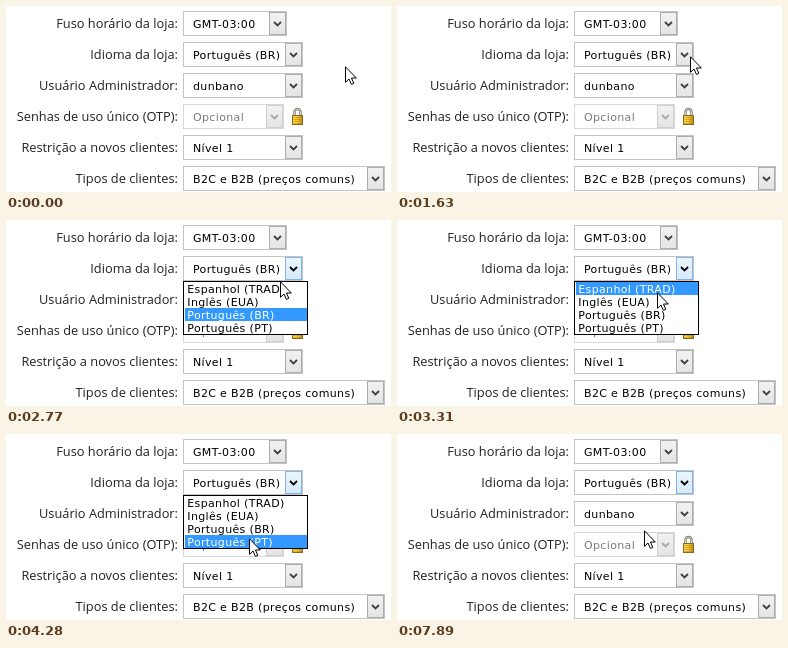
These frames come from a looping animation (385x186 px, 8290 ms). An HTML page:

```html
<!DOCTYPE html>
<html lang="pt-BR">
<head>
<meta charset="utf-8">
<title>Configurações da loja</title>
<style>
html, body { margin: 0; width: 100%; height: 100%; overflow: hidden; background: #fff; }
svg { display: block; width: 385px; height: 186px; }
rect { shape-rendering: crispEdges; }
.label { font: 12.8px "Open Sans", sans-serif; fill: #222; text-anchor: end; }
.value { font: 11px "DejaVu Sans", Verdana, sans-serif; letter-spacing: .35px; }
</style>
</head>
<body>
<svg id="stage" viewBox="0 0 385 186" xmlns="http://www.w3.org/2000/svg">
  <defs>
    <linearGradient id="grey" x2="0" y2="1"><stop stop-color="#f2f2f2"/><stop offset="1" stop-color="#e4e4e4"/></linearGradient>
    <linearGradient id="blue" x2="0" y2="1"><stop stop-color="#ecf5fd"/><stop offset="1" stop-color="#d6e9fb"/></linearGradient>
    <linearGradient id="gold"><stop stop-color="#ffe45c"/><stop offset=".5" stop-color="#f3c52f"/><stop offset="1" stop-color="#b98a1c"/></linearGradient>
  </defs>
</svg>
<script>
const LOOP = 8290;
const OPEN_AT = 2060, CLOSE_AT = 7890;
const LEFT = 177, ROW_H = 31, BOX_H = 25;
const LIST_TOP = 61, ITEM_H = 13;

// label, value, box width
const ROWS = [
  ["Fuso horário da loja:", "GMT-03:00", 104],
  ["Idioma da loja:", "Português (BR)", 120],
  ["Usuário Administrador:", "dunbano", 120],
  ["Senhas de uso único (OTP):", "Opcional", 101],
  ["Restrição a novos clientes:", "Nível 1", 120],
  ["Tipos de clientes:", "B2C e B2B (preços comuns)", 202]
];
const ITEMS = ["Espanhol (TRAD)", "Inglês (EUA)", "Português (BR)", "Português (PT)"];
const CHOSEN = 2;

// The pointer rests, then glides to each goal in evenly timed poses.
const HOME = { x: 339, y: 60 };
const GLIDES = [
  { from: 1120, to: 1630, poses: 5, x: 293, y: 50 },
  { from: 2620, to: 2770, poses: 2, x: 274, y: 61 },
  { from: 2920, to: 3610, poses: 6, x: 252, y: 78 },
  { from: 3890, to: 4280, poses: 4, x: 243, y: 104 },
  { from: 4710, to: 4860, poses: 2, x: 247, y: 96 }
];

const stage = document.getElementById("stage");

function add(parent, tag, attrs, text) {
  const el = document.createElementNS("http://www.w3.org/2000/svg", tag);
  for (const key in attrs) el.setAttribute(key, attrs[key]);
  if (text) el.textContent = text;
  return parent.appendChild(el);
}

function box(parent, x, y, width, height, fill, stroke) {
  return add(parent, "rect", { x: x + 0.5, y: y + 0.5, width: width - 1, height: height - 1, fill, stroke });
}

function value(parent, x, y, text, fill) {
  return add(parent, "text", { class: "value", x, y, fill }, text);
}

function drawRow([label, text, width], i) {
  const top = 5 + ROW_H * i, right = LEFT + width, off = i === 3;
  box(stage, LEFT, top, width, BOX_H, "#fff", off ? "#d8d8d8" : "#c4c4c4");
  const button = box(stage, right - 18, top + 1, 17, BOX_H - 2, "url(#grey)", off ? "#cfcfcf" : "#acacac");
  const arrow = add(stage, "path", {
    d: `M${right - 13} ${top + 11}l3.5 3.5l3.5 -3.5`,
    fill: "none", stroke: off ? "#a8a8a8" : "#404040", "stroke-width": 1.8
  });
  add(stage, "text", { class: "label", x: 172, y: top + 17 }, label);
  value(stage, 187, top + 17, text, off ? "#7a7a7a" : "#000");
  return { button, arrow };
}

function drawLock() {
  const shackle = "M288.5 110V106a3 3 0 0 1 6 0V110";
  add(stage, "path", { d: shackle, fill: "none", stroke: "#77736a", "stroke-width": 2.4 });
  add(stage, "path", { d: shackle, fill: "none", stroke: "#d8d6d0", "stroke-width": 1 });
  box(stage, 286, 109, 11, 10, "url(#gold)", "#8a6a1c");
  for (let y = 111; y < 118; y += 2)
    add(stage, "rect", { x: 287, y, width: 9, height: 1, fill: "#b98414", opacity: 0.5 });
}

function drawList() {
  const g = add(stage, "g", {});
  box(g, LEFT, LIST_TOP, 125, ITEMS.length * ITEM_H + 2, "#fff", "#000");
  const mark = add(g, "rect", { x: LEFT + 2, width: 122, height: ITEM_H, fill: "#3399ff" });
  const items = ITEMS.map((text, i) => value(g, 181.3, LIST_TOP + 12 + ITEM_H * i, text));
  return { g, mark, items };
}

const language = ROWS.map(drawRow)[1];
drawLock();
const list = drawList();
const pointer = add(stage, "path", {
  d: "M.5 .8V16.3L4 13L6.4 18.4L8.8 17.4L6.5 12H11.3Z",
  fill: "#fff", stroke: "#000"
});

function pointerAt(t) {
  let { x, y } = HOME;
  for (const glide of GLIDES) {
    if (t < glide.from) break;
    const gap = (glide.to - glide.from) / (glide.poses - 1);
    const pose = Math.min(glide.poses - 1, Math.floor((t - glide.from) / gap));
    const ease = Math.sin((pose + 0.5) / (glide.poses - 0.5) * Math.PI / 2);
    x += (glide.x - x) * ease;
    y += (glide.y - y) * ease;
  }
  return { x: Math.round(x), y: Math.round(y) };
}

function render(t) {
  const { x, y } = pointerAt(t);
  const hover = Math.floor((y - LIST_TOP - 2) / ITEM_H);
  const picked = hover < 0 ? CHOSEN : hover;
  const active = t >= OPEN_AT;
  pointer.setAttribute("transform", `translate(${x} ${y})`);
  language.button.setAttribute("fill", active ? "url(#blue)" : "url(#grey)");
  language.button.setAttribute("stroke", active ? "#7eb4ea" : "#acacac");
  language.arrow.setAttribute("stroke", active ? "#000" : "#404040");
  list.g.setAttribute("visibility", active && t < CLOSE_AT ? "visible" : "hidden");
  list.mark.setAttribute("y", LIST_TOP + 1 + ITEM_H * picked);
  list.items.forEach((item, i) => item.setAttribute("fill", i === picked ? "#fff" : "#000"));
}

const start = performance.now();
function tick() {
  render((performance.now() - start) % LOOP);
  requestAnimationFrame(tick);
}
tick();
</script>
</body>
</html>
```
